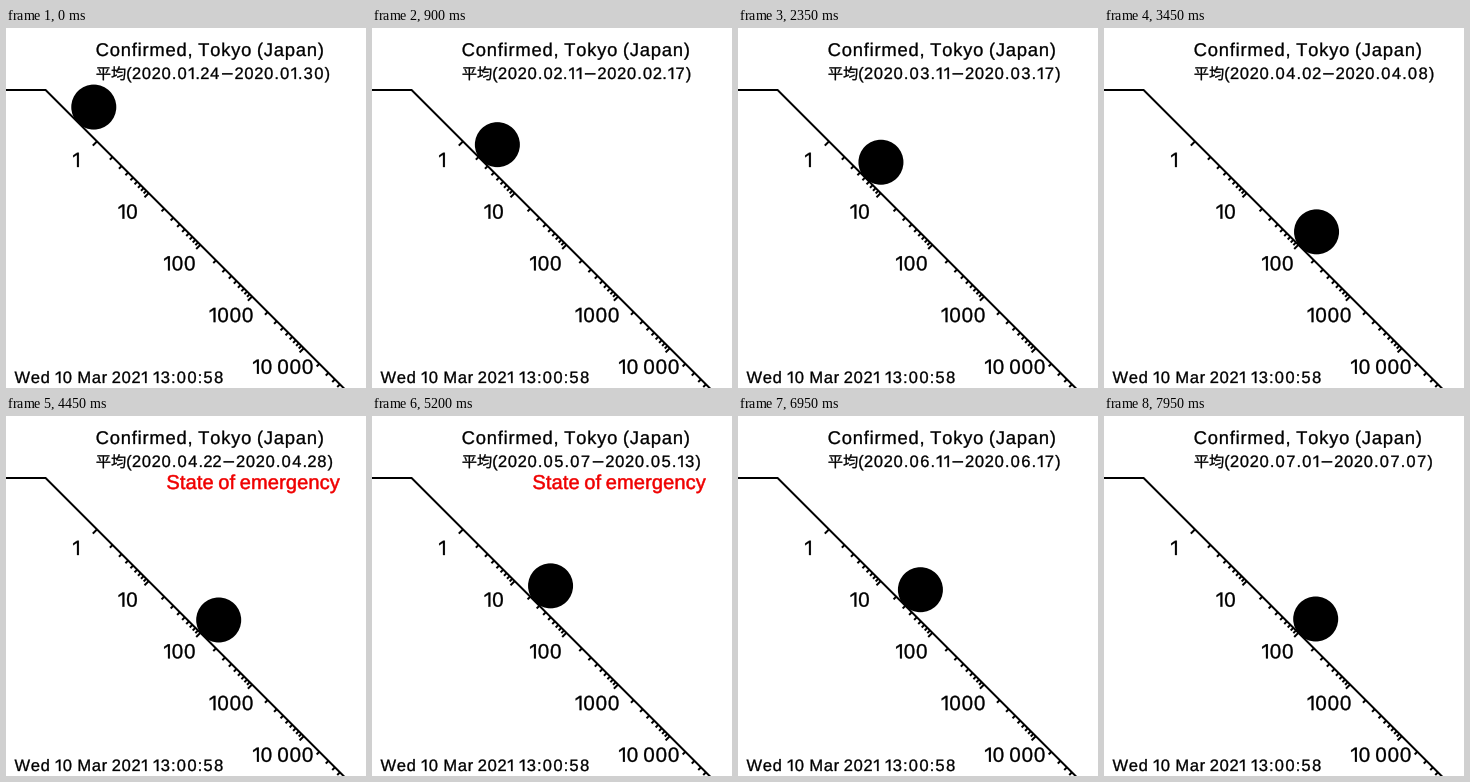
A matplotlib script that plays this animation: 360x360 px, repeating every 8 s.

```python
import numpy as np
import matplotlib.pyplot as plt
from matplotlib.animation import FuncAnimation
from matplotlib.patches import Circle, PathPatch
from matplotlib.path import Path
from matplotlib.textpath import TextPath

SIZE = 360
FRAMES = 160
START = np.datetime64("2020-01-24")
EMERGENCY = np.datetime64("2020-04-07"), np.datetime64("2020-05-25")

# Turning points of the epidemic curve: day, cases in the week from that day
TURNS = [(0, 3), (2, 1), (14, 1), (16, 11), (18, 16), (20, 22), (22, 22),
         (24, 10), (33, 8), (37, 27), (41, 32), (43, 22), (47, 35), (54, 69),
         (59, 297), (69, 777), (75, 1171), (89, 782), (92, 624), (97, 650),
         (102, 228), (114, 41), (118, 60), (130, 147), (135, 128), (137, 196),
         (144, 221), (150, 310), (159, 748)]
NO_CASES = range(7, 14)

# Geometry of the slope
CORNER = 39.6, 62
ONE_X = 91
DECADE = 51.7
RADIUS = 22.5

# Letter spacing in em
TRACK = 0.042
DIGIT, ONE, TWO, SPACE = 0.05, -0.14, -0.05, -0.06
FONTS = {"平": "Noto Sans CJK JP", "均": "Noto Sans CJK JP", "−": "DejaVu Sans"}
PLAIN_ONE = [(.34, 0), (.34, .69), (.25, .69), (.06, .56), (.06, .47),
             (.25, .595), (.25, 0), (.34, 0)]
glyphs = {}


def week_cases(day):
    if day in NO_CASES:
        return 0
    days, sums = zip(*TURNS)
    return round(np.exp(np.interp(day, days, np.log(sums))))


def kern(ch):
    if ch == " ":
        return SPACE
    return {"1": ONE, "2": TWO}.get(ch, DIGIT) if ch.isdigit() else 0


def text_path(text, family):
    return TextPath((0, 0), text, size=100, prop={"family": family})


def glyph(ch):
    """Outline and advance of one character, in em."""
    if ch not in glyphs:
        family = FONTS.get(ch, "Liberation Sans")
        advance = (text_path(ch + "l", family).get_extents().x1
                   - text_path("l", family).get_extents().x1) / 100
        if ch == "1":
            shape = Path(PLAIN_ONE, closed=True)
            verts, codes = shape.vertices, shape.codes
        elif ch == " ":
            verts, codes = np.empty((0, 2)), np.empty(0, np.uint8)
        else:
            shape = text_path(ch, family)
            verts, codes = shape.vertices / 100, shape.codes
        glyphs[ch] = verts, codes, advance
    return glyphs[ch]


def text_line(text, x, y, size, track=TRACK, centre=False):
    """Spaced text whose ink starts at x, or is centred on it."""
    verts, codes, pen = [], [], 0
    for ch in text:
        v, c, advance = glyph(ch)
        cjk = ch in "平均"
        scale = size * (0.92 if cjk else 1)
        # the flagged "1" keeps its place; other digits sit mid-cell
        shift = 0 if ch == "1" else kern(ch) * size / 2
        verts.append(v * (scale, -scale) + (pen + shift, 0))
        codes.append(c)
        pen += advance * scale + kern(ch) * size + (0 if cjk else track * size)
    path = Path(np.concatenate(verts), np.concatenate(codes))
    box = path.get_extents()
    anchor = (box.x0 + box.x1) / 2 if centre else box.x0
    return Path(path.vertices + (x - anchor, y), path.codes)


def slope_point(log_value):
    x = ONE_X + DECADE * log_value
    return x, CORNER[1] + x - CORNER[0]


def ball_centre(day):
    cases = week_cases(day)
    if cases == 0:
        return 27.8, 39.2
    x, y = slope_point(np.log10(cases / 7))
    return x + 15.8, y - 15.3


def date_line(day):
    first, last = (str(START + d).replace("-", ".") for d in (day, day + 6))
    return text_line(f"平均({first}−{last})", 90.6, 51, 16.5)


fig = plt.figure(figsize=(SIZE / 72, SIZE / 72), dpi=72, facecolor="white")
ax = fig.add_axes([0, 0, 1, 1])
ax.set_xlim(0, SIZE)
ax.set_ylim(SIZE, 0)
ax.axis("off")


def add_text(path, color="black", edge=0.3):
    return ax.add_patch(PathPatch(path, fc=color, ec=color, lw=edge))


ax.plot([-5, CORNER[0], CORNER[0] + 310], [CORNER[1]] * 2 + [CORNER[1] + 310],
        color="black", lw=2, solid_joinstyle="miter")

for power in range(5):
    for digit in range(1, 10):
        x, y = slope_point(power + np.log10(digit))
        reach = 4.2 if digit == 1 else 2.7
        ax.plot([x, x - reach], [y, y + reach], color="black", lw=2,
                solid_capstyle="butt")
    x, y = slope_point(power)
    label = "10 000" if power == 4 else str(10 ** power)
    add_text(text_line(label, x - 21, y + 25.6, 20.6, -.01, True))

add_text(text_line("Confirmed, Tokyo (Japan)", 90.6, 28, 18.4))
add_text(text_line("Wed 10 Mar 2021 13:00:58", 8.6, 355, 16.5))
dates = add_text(date_line(0))
notice = add_text(text_line("State of emergency", 161.3, 73, 20, .007),
                  "#f00000", 0.5)
ball = ax.add_patch(Circle(ball_centre(0), RADIUS, fc="black", lw=0, zorder=3))


def draw(day):
    ball.center = ball_centre(day)
    dates.set_path(date_line(day))
    notice.set_visible(bool(EMERGENCY[0] <= START + day <= EMERGENCY[1]))
    return ball, dates, notice


anim = FuncAnimation(fig, draw, frames=FRAMES, interval=50, repeat=True,
                     repeat_delay=0, blit=False)
plt.show()
```
